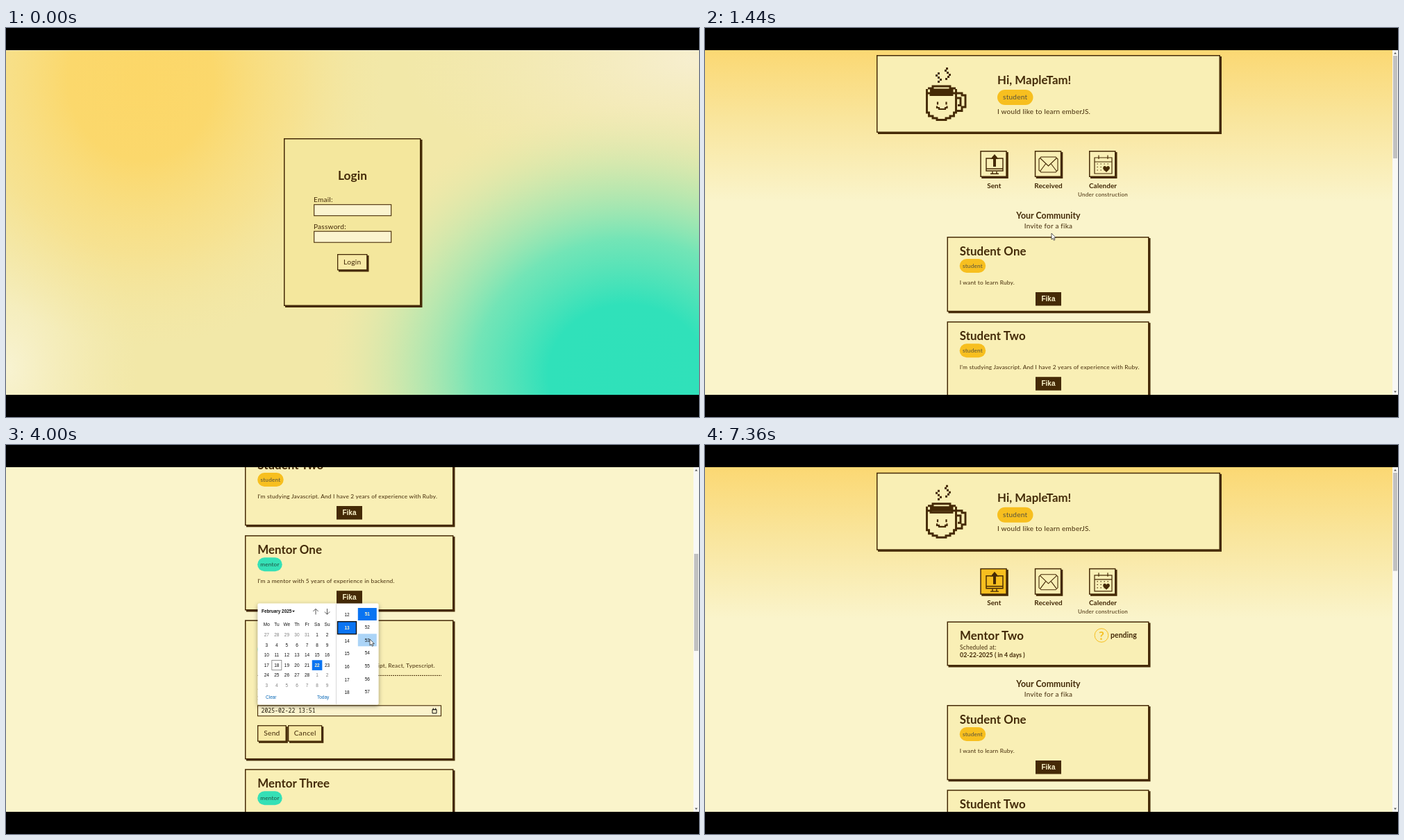
An HTML page that plays this animation: 998x561 px, repeating every 7440 ms.

```html
<!DOCTYPE html>
<html lang="en">
<head>
<meta charset="utf-8">
<title>Fika login and invitation</title>
<style>
  html, body { margin: 0; width: 100%; height: 100%; overflow: hidden; background: #000; }
  svg { display: block; }
  text { font-family: Lato, "Open Sans", sans-serif; letter-spacing: .022em; fill: #432a08; white-space: pre; }
  .b { font-weight: 700; letter-spacing: .004em; }
  .m { text-anchor: middle; }
  .arial { font-family: "Liberation Sans", Arial, sans-serif; letter-spacing: 0; }
  .mono { font-family: "Noto Sans Mono", "DejaVu Sans Mono", monospace; letter-spacing: 0; fill: #1c1608; }
  .black { fill: #111; }
  .grey { fill: #808080; }
  .blue { fill: #0b69b7; }
  .cream { fill: #fbf3cb; }
  .student { fill: #54503f; }
  .mentor { fill: #1f4e41; }
  .gold { fill: #f5bf20; }
</style>
</head>
<body>
<svg width="998" height="561" viewBox="0 0 998 561">
  <defs>
    <radialGradient id="sun" gradientUnits="userSpaceOnUse" cx="0" cy="0" r="1" gradientTransform="translate(195 75) scale(350 385)">
      <stop offset="0" stop-color="#fcd768"/>
      <stop offset=".3" stop-color="#fbd86c"/>
      <stop offset=".65" stop-color="#f8df87" stop-opacity=".7"/>
      <stop offset="1" stop-color="#f4e6a0" stop-opacity="0"/>
    </radialGradient>
    <radialGradient id="sea" gradientUnits="userSpaceOnUse" cx="0" cy="0" r="1" gradientTransform="translate(895 500) scale(440 390)">
      <stop offset="0" stop-color="#2fe1ba"/>
      <stop offset=".26" stop-color="#30e1ba"/>
      <stop offset=".5" stop-color="#5ce4b9" stop-opacity=".85"/>
      <stop offset=".72" stop-color="#9ee7b3" stop-opacity=".55"/>
      <stop offset="1" stop-color="#e4e9ab" stop-opacity="0"/>
    </radialGradient>
    <radialGradient id="paleTop" gradientUnits="userSpaceOnUse" cx="0" cy="0" r="1" gradientTransform="translate(998 45) scale(430 190)">
      <stop offset="0" stop-color="#f7efd0"/>
      <stop offset="1" stop-color="#f3eabc" stop-opacity="0"/>
    </radialGradient>
    <radialGradient id="paleLeft" gradientUnits="userSpaceOnUse" cx="0" cy="0" r="1" gradientTransform="translate(0 490) scale(190 260)">
      <stop offset="0" stop-color="#f8f3d2"/>
      <stop offset="1" stop-color="#f5ecb8" stop-opacity="0"/>
    </radialGradient>
    <linearGradient id="dawn" x2="0" y2="1">
      <stop offset="0" stop-color="#fbd873"/>
      <stop offset=".45" stop-color="#f9e59c"/>
      <stop offset="1" stop-color="#faf4cb"/>
    </linearGradient>
    <filter id="soft" x="-10%" y="-10%" width="120%" height="125%">
      <feDropShadow dx="0" dy="2" stdDeviation="3" flood-opacity=".4"/>
    </filter>
    <clipPath id="screen"><rect y="32" width="998" height="497"/></clipPath>
    <clipPath id="times"><rect x="476" y="235" width="60" height="130"/></clipPath>
  </defs>
  <rect width="998" height="561"/>
  <g id="view" clip-path="url(#screen)"></g>
</svg>
<script>
const LOOP = 7440, STEP = 80, INK = '#452a06', PAPER = '#f9efb5', GOLD = '#f7bf1f', BLUE = '#0a74f2';
const view = document.getElementById('view');

const clamp = p => Math.max(0, Math.min(1, p));
const range = n => [...Array(n).keys()];
const ease = p => 1 - (1 - clamp(p)) ** 3;

const text = (x, y, size, str, cls = '') =>
  `<text x="${x}" y="${y}" font-size="${size}" class="${cls}">${str}</text>`;
const rect = (x, y, w, h, fill, extra = '') =>
  `<rect x="${x}" y="${y}" width="${w}" height="${h}" fill="${fill}" ${extra}/>`;
const line = (d, width = 1.4, extra = '') =>
  `<path d="${d}" fill="none" stroke="${INK}" stroke-width="${width}" ${extra}/>`;
const move = (x, y, body) => `<g transform="translate(${x} ${y})">${body}</g>`;

// Outlined box with a hard shadow to the lower right
const box = (x, y, w, h, fill = PAPER, b = 1.5) =>
  rect(x + 2, y + 2, w, h, INK) +
  rect(x + b / 2, y + b / 2, w - b, h - b, fill, `stroke="${INK}" stroke-width="${b}"`);
const button = (x, y, w, h, label, hot) =>
  box(x, y, w, h, hot ? INK : '#f8eaa6', 1.3) +
  text(x + w / 2, y + 15, 10.3, label, hot ? 'm cream' : 'm');
const field = (x, y, w, h, fill = '#fbf4cf') =>
  rect(x, y, w, h, fill, `stroke="${INK}" stroke-width="1.1"`);
const pill = (x, y, w, h, size, role) =>
  rect(x, y, w, h, role === 'student' ? GOLD : '#35e0b6', `rx="${h / 2}"`) +
  text(x + w / 2, y + h / 2 + size * .33, size, role, 'm ' + role);

function login(t) {
  const dots = Math.floor(clamp((t - 320) / 400) * 8);
  const filled = t >= 320;
  let s = rect(0, 32, 998, 497, '#f2e8a8');
  for (const id of ['paleTop', 'paleLeft', 'sun', 'sea']) s += rect(0, 32, 998, 497, `url(#${id})`);
  s += rect(0, 32, 998, 1, '#fff', 'opacity=".4"');
  s += box(400, 159, 197.5, 242, '#f4e79d');
  s += text(499, 219, 17.3, 'Login', 'b m');
  s += text(443, 251, 10.1, 'Email:') + field(443.7, 254.7, 111, 16, filled ? '#e6eeee' : undefined);
  s += text(443, 289.5, 10.1, 'Password:') + field(443.7, 293.2, 111, 16);
  if (filled) s += text(448, 266, 8.7, 'mapletam@mail.test', 'arial black');
  s += text(448, 304.2, 8.7, '•'.repeat(dots), 'arial black');
  if (dots && t < 960) s += rect(448.7 + dots * 3.04, 296.5, .7, 9, '#222');
  return s + button(477, 326, 43.5, 23.5, 'Login', t >= 960);
}

function mug() {
  return line('M319.5 88V122H322.5V127H328V130H334V132.5H347V130H353V127H358.5V122H361.5V88' +
      'M321 87H328V84H353V87H361M320 94H325V96.5H356V94H361' +
      'M362 94H370V97H375V114H370V119.5H362M363 101H368V111.5H364', 2.9) +
    rect(324, 87.5, 33.5, 7.5, INK) +
    line('M335 106.5V110.5M347.5 106.5V110.5M334 112.5V115H337V117H346V115H348.5V112.5', 2.2) +
    line('M347 58.5h3M345 61.5h3M348 64.5h3M351 67.5h3M349 70.5h3M346 73.5h3' +
      'M335 65.5h3M332 68.5h3M335 71.5h3M338 74.5h3M335 77.5h3', 3);
}

function icons(sent) {
  const dots = range(12).map(i => `M${564.5 + i % 4 * 5} ${196 + Math.floor(i / 4) * 4.5}h1.4`).join('');
  return box(396.3, 177, 38.5, 38, sent ? GOLD : PAPER) + box(474.8, 177, 38.5, 38) + box(553, 177, 38.5, 38) +
    line('M412 188H405V206H429V188H422M414 207V210M420 207V210M411 210.3H423M405 203H429') +
    `<path d="M417 182L423 189H419V200H415V189H411Z" fill="${INK}"/>` +
    line('M484 186H505L508 189V205L505 208H484L481 205V189ZM483 188L494.5 199L506 188M483 206L490.5 196M506 206L498.5 196', 1.1) +
    line('M561 187H586V210H561ZM561 193H586M567 183.5V189M580 183.5V189' + dots, 1.2) +
    `<path d="M578 208L573.3 203.2Q572.8 199 576 199Q578 199.5 578 201Q578 199.5 580.5 199Q583.5 199.5 582.7 203.2Z" fill="${INK}"/>` +
    text(416.3, 230.5, 10, 'Sent', 'b m') + text(494.6, 230.5, 10, 'Received', 'b m') +
    text(573, 230.5, 10, 'Calender', 'b m') + text(573, 242.7, 8.1, 'Under construction', 'm');
}

const header = sent =>
  box(247, 39, 495, 112) + mug() +
  text(421, 81, 16.8, 'Hi, MapleTam!', 'b') + pill(421, 89, 51.5, 22, 10.1, 'student') +
  text(421, 123.7, 10, 'I would like to learn emberJS.') + icons(sent);

const sentCard = () =>
  box(348.5, 254.5, 291, 64) + text(367, 281, 16.9, 'Mentor Two', 'b') +
  text(367, 295.4, 8.5, 'Scheduled at:') + text(367, 306.4, 8.8, '02-22-2025 ( in 4 days )', 'b') +
  `<circle cx="571" cy="274.5" r="9.8" fill="none" stroke="${GOLD}"/>` +
  text(571, 280.5, 17, '?', 'b m gold') + text(584, 278, 10.5, 'pending', 'b');

const people = [
  ['Student One', 'student', 'I want to learn Ruby.'],
  ['Student Two', 'student', "I'm studying Javascript. And I have 2 years of experience with Ruby."],
  ['Mentor One', 'mentor', "I'm a mentor with 5 years of experience in backend."],
  ['Mentor Two', 'mentor', 'I guide students in web development. Javascript, React, Typescript.'],
  ['Mentor Three', 'mentor', "I'm a mentor with 3 years of experience in frontend."],
  ['Mentor Four', 'mentor', 'I can help with databases.']
];

function form(t) {
  const value = t < 3120 ? 'yyyy-<tspan font-weight="700">mm</tspan>-dd --:--'
    : '2025-02-22 ' + (t < 3520 ? '12:51' : t < 4640 ? '13:51' : '13:10');
  return line('M362 80H627', 1, 'stroke-dasharray="2 1"') +
    text(362, 102, 17.3, 'Send a Fika Invitation', 'b') + text(362, 115.3, 8.6, 'Schedule Time:') +
    field(362.5, 123.4, 264, 15, '#fbf3cd') + text(367.5, 134, 8.15, value, 'mono') +
    line('M614 129H620V134.5H614ZM614 129.3H620M615.3 127V129M618.7 127V129', 1, 'style="stroke:#111"') +
    button(362, 151.7, 41.8, 23.7, 'Send', t >= 5440) + button(406, 151.7, 49.3, 23.7, 'Cancel');
}

function cards(t, open) {
  const x = open ? 344 : 348.5, w = open ? 300.5 : 291, tx = x + 18.2;
  let y = 301;
  return people.map(([name, role, about]) => {
    const wide = open && name === 'Mentor Two';
    const h = wide ? 201 : 108.3;
    const body = box(x, 0, w, h) + text(tx, 27, 16.9, name, 'b') +
      pill(tx, 32, role === 'student' ? 37.5 : 35.5, 20, 8.3, role) + text(tx, 68.5, 8.4, about) +
      (wide ? form(t) : rect(476, 80, 37, 19.5, INK) + text(494.5, 93.3, 10, 'Fika', 'arial b m cream'));
    const out = move(0, y, body);
    y += h + 13.9;
    return out;
  }).join('');
}

function scrollbar(scroll, height) {
  const k = 481 / height;
  return rect(990, 32, 8, 497, '#f8f8f5') + rect(991, 40 + scroll * k, 6, 497 * k, '#c1c1c1') +
    '<path d="M992 37.5L994 35L996 37.5ZM992 523.5L994 526L996 523.5Z" fill="#555"/>';
}

function dashboard(t) {
  const open = t >= 2000 && t < 5920, sent = t >= 6800;
  const scroll = 415.2 * (t < 4000 ? ease((t - 1440) / 400) : 1 - ease((t - 5920) / 400));
  const list = text(494.5, 275, 12.3, 'Your Community', 'b m') + text(494.5, 289, 10, 'Invite for a fika', 'm') + cards(t, open);
  const page = rect(0, 32, 998, 218, 'url(#dawn)') + move(0, sent ? .8 : 0, header(sent)) +
    (sent ? sentCard() : '') + move(0, sent ? 74 : 0, list);
  return rect(0, 32, 998, 497, '#faf4cb') + move(0, -scroll, page) +
    scrollbar(scroll, 1615 + (open ? 92.7 : sent ? 74 : 0)) + (t >= 2720 && t < 5120 ? picker(t) : '');
}

function picker(t) {
  const row = 18.65, mouse = pointer(t);
  const small = (x, y, s, cls = 'black') => text(x, y + 2.3, 6.5, s, 'arial m ' + cls);
  let s = rect(362.5, 228.5, 174, 146, '#fff', 'rx="2" filter="url(#soft)"') +
    text(368, 242.3, 6.4, 'February 2025', 'arial b black') + '<path d="M412 238.8h4l-2 2.4z" fill="#222"/>' +
    line('M446 244.5V236.5M442.3 240L446 236.3L449.7 240M462.5 236V244M458.8 240.5L462.5 244.2L466.2 240.5', .9, 'style="stroke:#444"') +
    rect(475, 229, .8, 145, '#d0d0d0') +
    text(374, 365.5, 6.5, 'Clear', 'arial blue') + text(448, 365.5, 6.5, 'Today', 'arial blue');
  'Mo Tu We Th Fr Sa Su'.split(' ').forEach((d, i) => s += small(375.3 + i * 14.55, 259, d));
  for (const i of range(42)) {
    const x = 375.3 + i % 7 * 14.55, y = 274 + Math.floor(i / 7) * 14.52, n = i - 4;
    const day = n < 1 ? n + 31 : n > 28 ? n - 28 : n;
    const picked = n === 22 && t >= 3120;
    if (n === 18) s += rect(x - 7, y - 7, 14, 14, 'none', 'stroke="#777" stroke-width=".8"');
    if (picked) s += rect(x - 7.3, y - 7.3, 14.6, 14.6, BLUE);
    s += small(x, y, day, picked ? 'b cream' : n < 1 || n > 28 ? 'grey' : 'black');
  }

  const cell = (x, y, n, chosen, extra) => {
    const over = Math.abs(mouse.x - x) < 13 && Math.abs(mouse.y + 1 - y) < row / 2;
    const fill = chosen ? BLUE : over ? '#abd4f7' : 'none';
    return rect(x - 13.5, y - 9, 27, 18, fill, extra) + small(x, y, String(n).padStart(2, '0'), chosen ? 'b cream' : 'black');
  };
  const hour = t < 3120 ? -1 : t < 3520 ? 12 : 13;
  const minute = t < 3120 ? -1 : t < 4640 ? 51 : 10;
  const offset = 16 * (1 - (1 - clamp((t - 4080) / 480)) ** 2);
  const first = Math.floor(offset);
  s += '<g clip-path="url(#times)">';
  for (const i of range(7)) s += cell(491, 245 + i * row, 12 + i, 12 + i === hour,
    12 + i === hour && t >= 3520 ? 'stroke="#111" stroke-width="1.4"' : '');
  for (const i of range(9)) {
    const n = (51 + first + i) % 60;
    s += cell(520.3, 244 + (first + i - offset) * row, n, n === minute);
  }
  return s + '</g>';
}

// time, x, y, shape
const path = [
  [160, 520, 300, 'arrow'], [320, 499, 263, 'beam'], [400, 499, 263, 'beam'], [640, 500, 297, 'beam'],
  [800, 500, 297, 'beam'], [960, 499, 336, 'hand'], [1200, 499, 336, 'arrow'], [1360, 499, 296, 'arrow'],
  [1760, 499, 296, 'arrow'], [1920, 492, 338, 'hand'], [2000, 492, 338, 'beam'], [2240, 492, 338, 'beam'],
  [2560, 617, 383, 'arrow'], [2720, 617, 383, 'arrow'], [3040, 449, 318, 'arrow'], [3120, 449, 318, 'arrow'],
  [3440, 492, 263, 'arrow'], [3600, 492, 263, 'arrow'], [3920, 524, 280, 'arrow'], [4160, 524, 280, 'arrow'],
  [4480, 524, 299, 'arrow'], [4800, 524, 299, 'arrow'], [5040, 575, 345, 'arrow'], [5120, 575, 345, 'arrow'],
  [5440, 377, 421, 'hand'], [5920, 377, 421, 'arrow'], [6320, 377, 421, 'arrow'], [6640, 417, 198, 'hand'],
  [7200, 417, 198, 'none']
];

function pointer(t) {
  const i = path.findLastIndex(k => k[0] <= t);
  if (i < 0) return { x: 0, y: 0, shape: 'none' };
  const a = path[i], b = path[i + 1] || a;
  const p = b === a ? 0 : (t - a[0]) / (b[0] - a[0]), q = p * p * (3 - 2 * p);
  return { x: a[1] + (b[1] - a[1]) * q, y: a[2] + (b[2] - a[2]) * q, shape: a[3] };
}

const outline = 'fill="#fff" stroke="#333" stroke-width=".8" stroke-linejoin="round"';
const shapes = {
  none: '',
  arrow: `<path d="M0 0V9L2.1 7.2L3.4 10.2L4.9 9.5L3.6 6.6H6.3Z" ${outline}/>`,
  beam: '<path d="M-1.8 -4H1.8M0 -4V4M-1.8 4H1.8" fill="none" stroke="#555" stroke-width=".8"/>',
  hand: `<path d="M-1 1Q0 -.8 1 1V5L5 6V9L4 12.5H-1L-3 8.5Q-3 6.5 -1 8Z" ${outline}/>`
};

let shown = -1;
function frame(now) {
  const t = Math.floor(now % LOOP / STEP) * STEP;
  if (t !== shown) {
    shown = t;
    const c = pointer(t);
    view.innerHTML = (t < 1200 ? login(t) : dashboard(t)) + move(c.x, c.y, shapes[c.shape]);
  }
  requestAnimationFrame(frame);
}
frame(performance.now());
</script>
</body>
</html>
```
